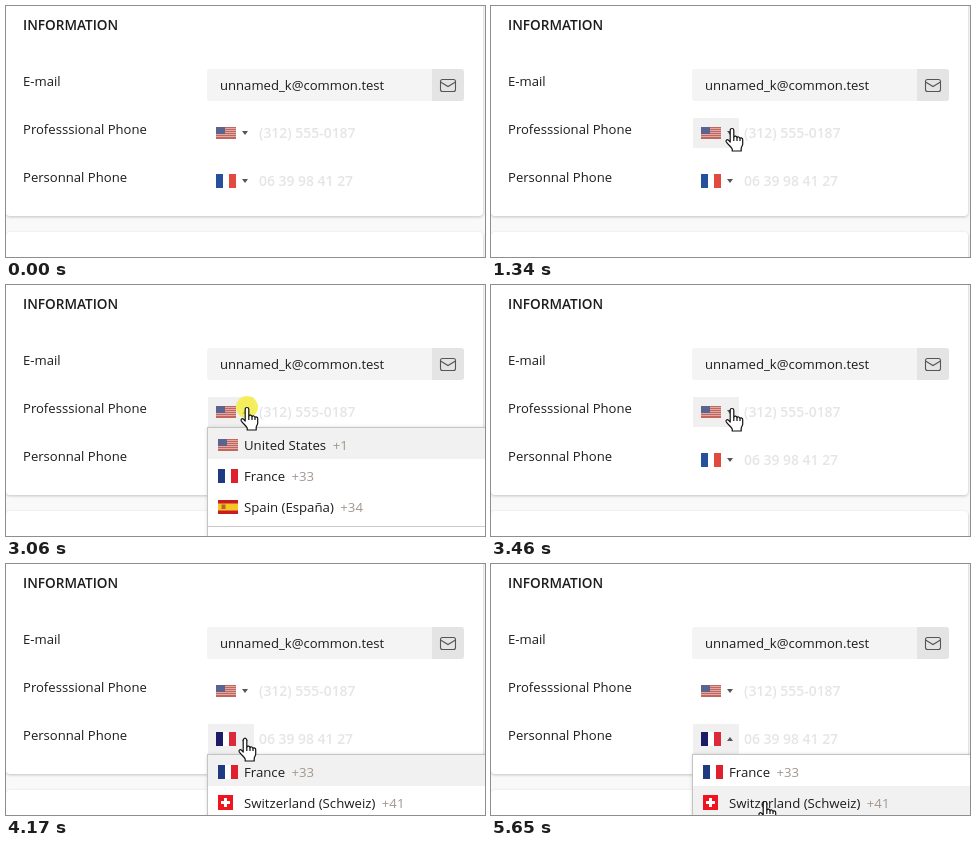
Animation of 479x251 px, one loop 8000 ms. Source, as an HTML page:

```html
<!DOCTYPE html>
<html lang="en">
<head>
<meta charset="utf-8">
<title>Phone fields</title>
<style>
html, body { margin: 0; width: 100%; height: 100%; overflow: hidden; background: #f9f9f9; }
svg { display: block; font: 13.1px "Open Sans", "Noto Sans", sans-serif; fill: #1c1c1c; }
.title { font-weight: 600; font-size: 13.6px; }
.hint { font-weight: 600; font-size: 13.95px; fill: #e5e5e5; }
.item { font-size: 13.2px; }
.code { fill: #a0978f; }
.card { fill: #fff; filter: drop-shadow(0 1px 1.5px rgba(0,0,0,.22)); }
.sheet { fill: #fff; stroke: #c4c4c4; filter: drop-shadow(1px 1px 2px rgba(0,0,0,.2)); }
.line { fill: none; stroke: #555; stroke-width: 1.1; }
.pen { fill: #fff; stroke: #111; stroke-width: 1.2; stroke-linejoin: round; }
</style>
</head>
<body>
<svg width="479" height="251" viewBox="0 0 479 251">
  <defs>
    <g id="us"></g>
    <g id="fr"><path fill="#fff" d="M0 0h20v14H0z"/><path fill="#27509c" d="M0 0h7v14H0z"/><path fill="#e2493f" d="M13 0h7v14h-7z"/></g>
    <g id="frDark"><path fill="#fff" d="M0 0h20v14H0z"/><path fill="#1b1b68" d="M0 0h7v14H0z"/><path fill="#dc2a3a" d="M13 0h7v14h-7z"/></g>
    <g id="frList"><path fill="#fff" d="M0 0h20v14H0z"/><path fill="#1f3a80" d="M0 0h7v14H0z"/><path fill="#e0202c" d="M13 0h7v14h-7z"/></g>
    <g id="es"><path fill="#c81b23" d="M0 0h20v14H0z"/><path fill="#f7c525" d="M0 3.5h20v7H0z"/><path fill="#b5652b" d="M3.5 4.5h4v4.5h-4z"/></g>
    <g id="ch"><path fill="#f0141e" d="M0 0h15v15H0z"/><path fill="#fff" d="M6 3h3v3h3v3H9v3H6V9H3V6h3z"/></g>
  </defs>

  <rect class="card" y="-20" width="477" height="230" rx="4"/>
  <rect class="card" y="226" width="477" height="60" rx="4"/>
  <text class="title" x="17" y="24">INFORMATION</text>
  <text x="17" y="80">E-mail</text>
  <text x="17" y="128">Professsional Phone</text>
  <text x="17" y="176">Personnal Phone</text>

  <rect x="201" y="63" width="257" height="32" rx="3" fill="#f4f4f4"/>
  <path d="M426 63h29a3 3 0 0 1 3 3v26a3 3 0 0 1-3 3h-29z" fill="#e4e4e4"/>
  <text x="214" y="84">unnamed_k@common.test</text>
  <g class="line"><rect x="434.5" y="73.5" width="15" height="12" rx="2"/><path d="M434.5 76l7.5 4.5 7.5-4.5"/></g>

  <rect id="btn0" x="202" y="112" width="46" height="30" fill="#f0f0f0"/>
  <rect id="btn1" x="202" y="160" width="46" height="30" fill="#f0f0f0"/>
  <use href="#us" x="210" y="121"/>
  <use id="flag1" href="#fr" x="210" y="168"/>
  <path id="tri0" fill="#555"/>
  <path id="tri1" fill="#555"/>
  <text class="hint" x="253" y="132">(312) 555-0187</text>
  <text class="hint" x="253" y="180">06 39 98 41 27</text>

  <g id="menu0"></g>
  <g id="menu1"></g>

  <circle id="click" r="11" fill="#f4ec3c" fill-opacity=".82"/>
  <g id="cursor">
    <g id="hand">
      <path class="pen" d="M-1.8 14V2.3a1.8 1.8 0 0 1 3.6 0V9a1.7 1.7 0 0 1 3.2.6 1.7 1.7 0 0 1 3 .8 1.6 1.6 0 0 1 2.7 1.2V16c0 2-1.5 3-1.5 4.5V23H.2v-2C-.3 19-4.3 16.5-5.8 13.8c-.8-1.6 1-2.8 2.3-1.6z"/>
      <path class="pen" d="M1.8 9v4M5 9.6v3.4M8 10.4V13"/>
    </g>
    <path id="arrow" class="pen" d="M0 0v16l3.7-3.5 2.4 5.6 2.5-1.1-2.4-5.4h5.1z"/>
    <path id="beam" class="line" d="M-3 -8h2l1 1 1-1h2M0-7V7M-3 8h2l1-1 1 1h2"/>
  </g>
</svg>
<script>
const $ = id => document.getElementById(id);
const show = (id, on) => $(id).style.display = on ? "" : "none";

$("us").innerHTML = '<path fill="#c4665c" d="M0 0h20v12H0z"/>' +
  [1, 3, 5, 7, 9].map(y => `<path fill="#dcaaa6" d="M0 ${y}h20v1H0z"/>`).join("") +
  '<path fill="#5a648f" d="M0 0h9v7H0z"/>';

// Country list: [flag, flag height, name, dial code]
const ROW = 31;
function buildMenu(n, top, rows) {
  $("menu" + n).innerHTML =
    `<rect class="sheet" x="201.5" y="${top + .5}" width="300" height="160"/>
     <rect id="pick${n}" x="202" width="290" height="${ROW}" fill="#f1f1f1"/>` +
    rows.map(([flag, h, name, code], i) => {
      const y = top + 1 + i * ROW;
      return `<use href="#${flag}" x="212" y="${y + Math.round(16.5 - h / 2)}"/>
        <text class="item" x="238" y="${y + 22}">${name}<tspan class="code" dx="6.5">${code}</tspan></text>`;
    }).join("");
}
buildMenu(0, 142, [["us", 12, "United States", "+1"], ["frList", 14, "France", "+33"], ["es", 14, "Spain (España)", "+34"]]);
$("menu0").insertAdjacentHTML("beforeend", '<path d="M202 241h290v1H202z" fill="#ccc"/>');
buildMenu(1, 190, [["frList", 14, "France", "+33"], ["ch", 15, "Switzerland (Schweiz)", "+41"]]);

const easeOut = p => 1 - (1 - p) ** 2;
const easeBoth = p => p ** 3 * (p * (6 * p - 15) + 10);

// Pointer travel sampled every 70 ms
function glide(t, start, steps, from, to, ease) {
  const p = ease(Math.min(1, (Math.floor((t - start) / 70) + 1) / steps));
  return from.map((v, i) => Math.round(v + (to[i] - v) * p));
}
function pointer(t) {
  if (t < 1340) return glide(t, 500, 12, [412, 265], [242, 120], easeOut);
  if (t < 3460) return [241, 122];
  if (t < 5160) return glide(t, 3460, 8, [241, 122], [239, 174], easeBoth);
  return glide(t, 5160, 8, [239, 174], [274, 237], easeBoth);
}

function draw(t) {
  const within = (a, b) => t >= a && t < b;
  const [x, y] = pointer(t);
  const open = [within(1670, 3130), t >= 4100];
  const tops = [112, 160];
  let overButton = false, overField = false;

  tops.forEach((top, n) => {
    const inRow = t >= 500 && y >= top && y < top + 30;
    const hot = inRow && x >= 202 && x < 248;
    overButton ||= hot;
    overField ||= inRow && x >= 248 && x < 458;
    show("btn" + n, hot || open[n]);
    show("menu" + n, open[n]);
    const row = Math.max(0, Math.floor((y - top - 31) / ROW));
    $("pick" + n).setAttribute("y", top + 31 + row * ROW);
    $("tri" + n).setAttribute("d", open[n] ? `M236 ${top + 17}h6l-3-4z` : `M236 ${top + 13}h6l-3 4z`);
    if (n) $("flag1").setAttribute("href", hot || open[1] ? "#frDark" : "#fr");
  });

  const hand = overButton || open[0] || open[1];
  show("cursor", t >= 500);
  show("hand", hand);
  show("beam", !hand && overField);
  show("arrow", !hand && !overField);
  $("cursor").setAttribute("transform", `translate(${x} ${y})`);
  $("click").setAttribute("transform", `translate(${x} ${y})`);
  show("click", within(1600, 1740) || within(3060, 3130) || within(4100, 4170));
}

const begin = performance.now();
function tick() {
  draw((performance.now() - begin) % 8000);
  requestAnimationFrame(tick);
}
tick();
</script>
</body>
</html>
```
